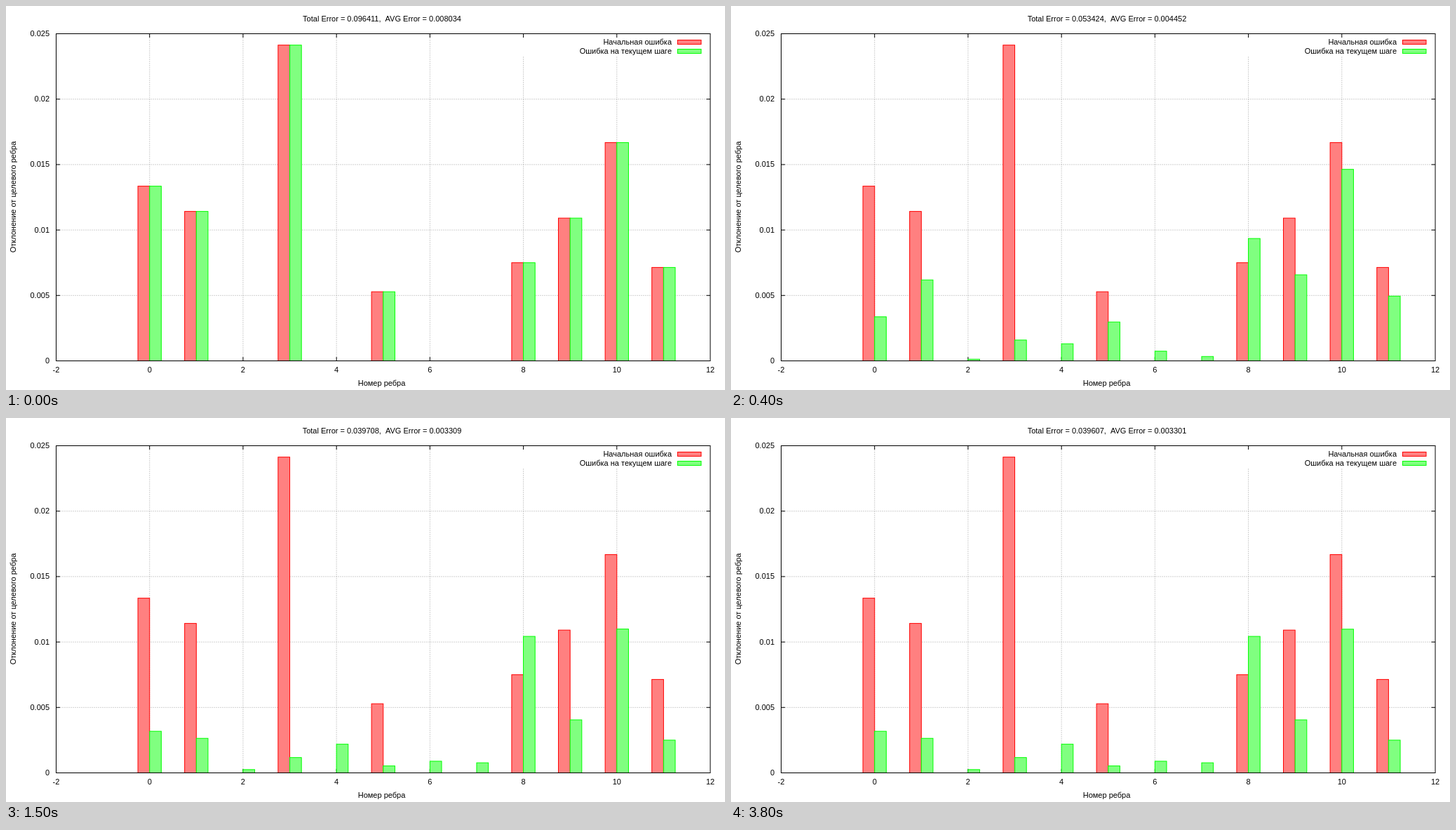
An HTML page with a canvas for the animation above (5000 ms loop, 1025 by 547 pixels).

```html
<!DOCTYPE html>
<html lang="ru">
<head>
<meta charset="utf-8">
<title>Error chart</title>
<style>
  html, body { margin: 0; width: 100%; height: 100%; overflow: hidden; background: #fff; }
  canvas { display: block; }
</style>
</head>
<body>
<canvas id="chart" width="1025" height="547"></canvas>
<script>
const ctx = document.getElementById('chart').getContext('2d');
const LOOP = 5000;
const LEFT = 71.5, RIGHT = 1004, TOP = 39.5, BOTTOM = 505.5;
const MAX = 0.025;
const RED = { edge: '#ff0000', fill: '#ff8080' };
const GREEN = { edge: '#00ff00', fill: '#80ff80' };

// Each edge's error relaxes from one value to another (in 1e-5) with its own time constant (ms).
const bar = (from, to, tau) => ({ from: from / 1e5, to: to / 1e5, tau });
const bars = [
  bar(1335, 318, 200), bar(1142, 264, 420), bar(0, 25, 480), bar(2413, 117, 200),
  bar(0, 219, 420), bar(528, 53, 490), bar(0, 89, 300), bar(0, 77, 530),
  bar(750, 1043, 400), bar(1091, 405, 400), bar(1668, 1098, 600), bar(714, 250, 500)
];

// Key points of the counter: time and total error.
const totals = [
  [0, 0.096411], [100, 0.085734], [400, 0.053424], [900, 0.039984],
  [1500, 0.039708], [2400, 0.039672], [3800, 0.039607]
];

// The chart is redrawn only at these moments.
const steps = [0, 100, 300, 400, 500, 600, 800, 900, 1000, 1100, 1300, 1500, 1800, 2100, 2400, 3700, 3800];

const xOf = v => LEFT + (v + 2) * (RIGHT - LEFT) / 14;
const yOf = v => BOTTOM - v * (BOTTOM - TOP) / MAX;
const valueAt = ({ from, to, tau }, t) => to + (from - to) * Math.exp(-((t / tau) ** 2));

function totalAt(t) {
  const next = totals.findIndex(([time]) => time > t);
  if (next < 0) return totals[totals.length - 1][1];
  const [t0, a] = totals[next - 1], [t1, b] = totals[next];
  return a + (b - a) * (t - t0) / (t1 - t0);
}

function line(x1, y1, x2, y2) {
  ctx.beginPath();
  ctx.moveTo(x1, y1);
  ctx.lineTo(x2, y2);
  ctx.stroke();
}

function gridLine(...ends) {
  ctx.strokeStyle = '#a0a0a0';
  ctx.setLineDash([1, 2]);
  line(...ends);
  ctx.setLineDash([]);
  ctx.strokeStyle = '#000';
}

function text(str, x, y, align = 'center') {
  ctx.fillStyle = '#000';
  ctx.textAlign = align;
  ctx.fillText(str, x, y);
}

function box(x1, y1, x2, y2, { edge, fill }) {
  ctx.fillStyle = fill;
  ctx.strokeStyle = edge;
  ctx.fillRect(x1, y1, x2 - x1, y2 - y1);
  ctx.strokeRect(x1, y1, x2 - x1, y2 - y1);
}

function drawAxes() {
  const tick = 5.5;
  for (let v = -2; v <= 12; v += 2) {
    const x = xOf(v);
    if (v > -2 && v < 12) {
      gridLine(x, BOTTOM, x, v >= 8 ? 72 : TOP);
      line(x, BOTTOM, x, BOTTOM - tick);
      line(x, TOP, x, TOP + tick);
    }
    text(String(v), x, 522);
  }
  for (let n = 0; n <= 5; n++) {
    const v = n * MAX / 5, y = yOf(v);
    if (n > 0 && n < 5) {
      gridLine(LEFT, y, RIGHT, y);
      line(LEFT, y, LEFT + tick, y);
      line(RIGHT, y, RIGHT - tick, y);
    }
    text(String(+v.toFixed(3)), 62, Math.floor(y) + 4, 'right');
  }
}

function drawBars(t, offset, color) {
  bars.forEach((b, n) => {
    const value = valueAt(b, t);
    if (value > 1e-5) box(xOf(n + offset), yOf(value), xOf(n + offset + 0.25), BOTTOM, color);
  });
}

function drawLabels(total) {
  text(`Total Error = ${total.toFixed(6)},\u00a0 AVG Error = ${(total / bars.length).toFixed(6)}`, 536, 22);
  text('Номер ребра', 535.5, 541);
  ctx.save();
  ctx.translate(14, 272);
  ctx.rotate(-Math.PI / 2);
  text('Отклонение от целевого ребра', 0, 0);
  ctx.restore();
  text('Начальная ошибка', 949, 55, 'right');
  text('Ошибка на текущем шаге', 949, 68, 'right');
  box(957.5, 48.5, 991, 54.5, RED);
  box(957.5, 61.5, 991, 67.5, GREEN);
}

function draw(time) {
  const t = steps.filter(step => step <= time).pop();
  ctx.fillStyle = '#fff';
  ctx.fillRect(0, 0, 1025, 547);
  ctx.font = '11px "Liberation Sans", Arial, sans-serif';
  ctx.lineWidth = 1;
  drawAxes();
  drawBars(0, -0.25, RED);
  drawBars(t, 0, GREEN);
  drawLabels(totalAt(t));
  ctx.strokeStyle = '#000';
  ctx.strokeRect(LEFT, TOP, RIGHT - LEFT, BOTTOM - TOP);
}

const begin = performance.now();
function loop() {
  draw((performance.now() - begin) % LOOP);
  requestAnimationFrame(loop);
}
loop();
</script>
</body>
</html>
```
